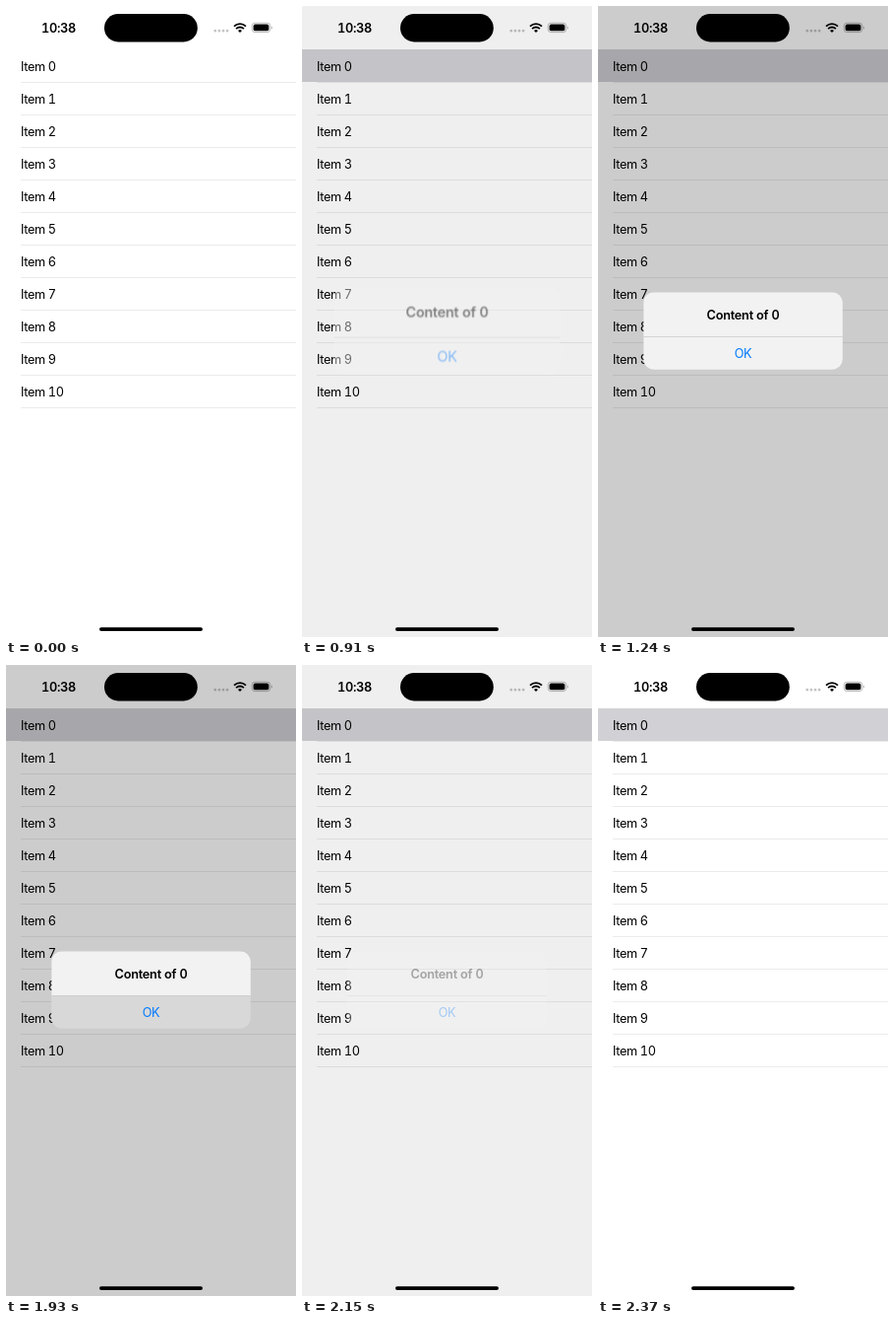
Animation, 295 px wide and 640 px high, one loop 2580 ms. Source, as an HTML page:

```html
<!DOCTYPE html>
<html lang="en">
<head>
<meta charset="utf-8">
<title>List with alert</title>
<style>
  html, body { margin: 0; width: 100%; height: 100%; overflow: hidden; background: #fff; }
  svg { display: block; width: 295px; height: 640px; }
  text {
    font: 400 12.75px Inter, "Liberation Sans", sans-serif;
    font-variant-numeric: tabular-nums;
    letter-spacing: -.4px;
  }
  .bold { font-weight: 600; letter-spacing: -.25px; }
  .mid { text-anchor: middle; }
  #card { transform-origin: 147.5px 329.5px; }
</style>
</head>
<body>
<svg viewBox="0 0 295 640">
  <defs>
    <clipPath id="round"><rect x="46.2" y="290.3" width="202.6" height="78.4" rx="10.5"/></clipPath>
  </defs>
  <rect width="295" height="640" fill="#fff"/>
  <g id="list"></g>
  <rect id="row" y="44" width="295" height="33" fill="#d1d1d5"/>
  <text x="15.1" y="65.5">Item 0</text>

  <text class="bold mid" x="53.5" y="26.7">10:38</text>
  <path d="M212.8 25.2h12.4" stroke="#c4c4c4" stroke-width="2.8" stroke-linecap="round" stroke-dasharray="0 4.1"/>
  <g fill="none" stroke="#000" stroke-width="1.8">
    <path d="M232 20.6a8.6 8.6 0 0 1 12 0"/>
    <path d="M234.1 23.1a5.6 5.6 0 0 1 7.8 0"/>
  </g>
  <path d="M238 27l-2-2.1a2.9 2.9 0 0 1 4 0z"/>
  <rect x="250.2" y="17.2" width="18.6" height="9.4" rx="3" fill="none" stroke="#aaa" stroke-width=".8"/>
  <rect x="251.6" y="18.5" width="15.8" height="6.8" rx="1.9"/>
  <path d="M269.9 20.4a1.7 1.7 0 0 1 0 3z" fill="#aaa"/>

  <rect id="dim" width="295" height="640"/>
  <rect x="100" y="8.1" width="94.8" height="28.3" rx="14.1"/>
  <rect x="95" y="630.2" width="105" height="3.8" rx="1.9"/>

  <g id="card">
    <g clip-path="url(#round)">
      <rect x="46" y="290" width="203" height="79" fill="#f2f2f2"/>
      <rect id="press" x="46" y="335.5" width="203" height="34" fill="#d8d8d8"/>
      <rect x="46" y="335" width="203" height=".7" fill="#c6c6c6"/>
    </g>
    <text class="bold mid" x="147.5" y="317.5">Content of 0</text>
    <text class="mid" x="147.5" y="356.8" fill="#007aff">OK</text>
  </g>
</svg>
<script>
const LOOP = 2580, OPEN = 800, CLOSE = 1930, TICK = 110, TICKS = 4;
const list = document.getElementById('list');

function add(tag, attrs, text = '') {
  const el = document.createElementNS('http://www.w3.org/2000/svg', tag);
  for (const k in attrs) el.setAttribute(k, attrs[k]);
  el.textContent = text;
  list.append(el);
}

for (let i = 0; i <= 10; i++) {
  const y = 33 * i;
  if (i) add('text', { x: 15.1, y: y + 65.5 }, 'Item ' + i);
  add('rect', { x: 15, y: y + 77, width: 280, height: 1, fill: '#ebebeb' });
}

const progress = (t, start) => Math.min(1, Math.max(0, (t - start) / (TICK * TICKS)));
const fall = (k, power) => (1 - k * k) ** power;
const shown = t => 1 - fall(progress(t, OPEN), 6);
const kept = t => fall(progress(t, CLOSE), 4);

// The picture is held between ticks of each transition.
const ticks = start => Array.from({ length: TICKS + 1 }, (_, i) => start + i * TICK);
const times = [0, ...ticks(OPEN), ...ticks(CLOSE), LOOP];

function play(id, pose) {
  const frames = times.map(t => ({ offset: t / LOOP, easing: 'step-end', ...pose(t) }));
  document.getElementById(id).animate(frames, { duration: LOOP, iterations: Infinity });
}

play('row', t => ({ opacity: t < OPEN ? 0 : 1 }));
play('dim', t => ({ opacity: .2 * shown(t) * kept(t) }));
play('card', t => ({
  opacity: shown(t) ** .7 * kept(t),
  transform: `scale(${1.2 - .2 * shown(t)})`
}));
play('press', t => ({ opacity: t < CLOSE ? 0 : Math.max(0, 1 - 2 * progress(t, CLOSE)) }));
</script>
</body>
</html>
```
